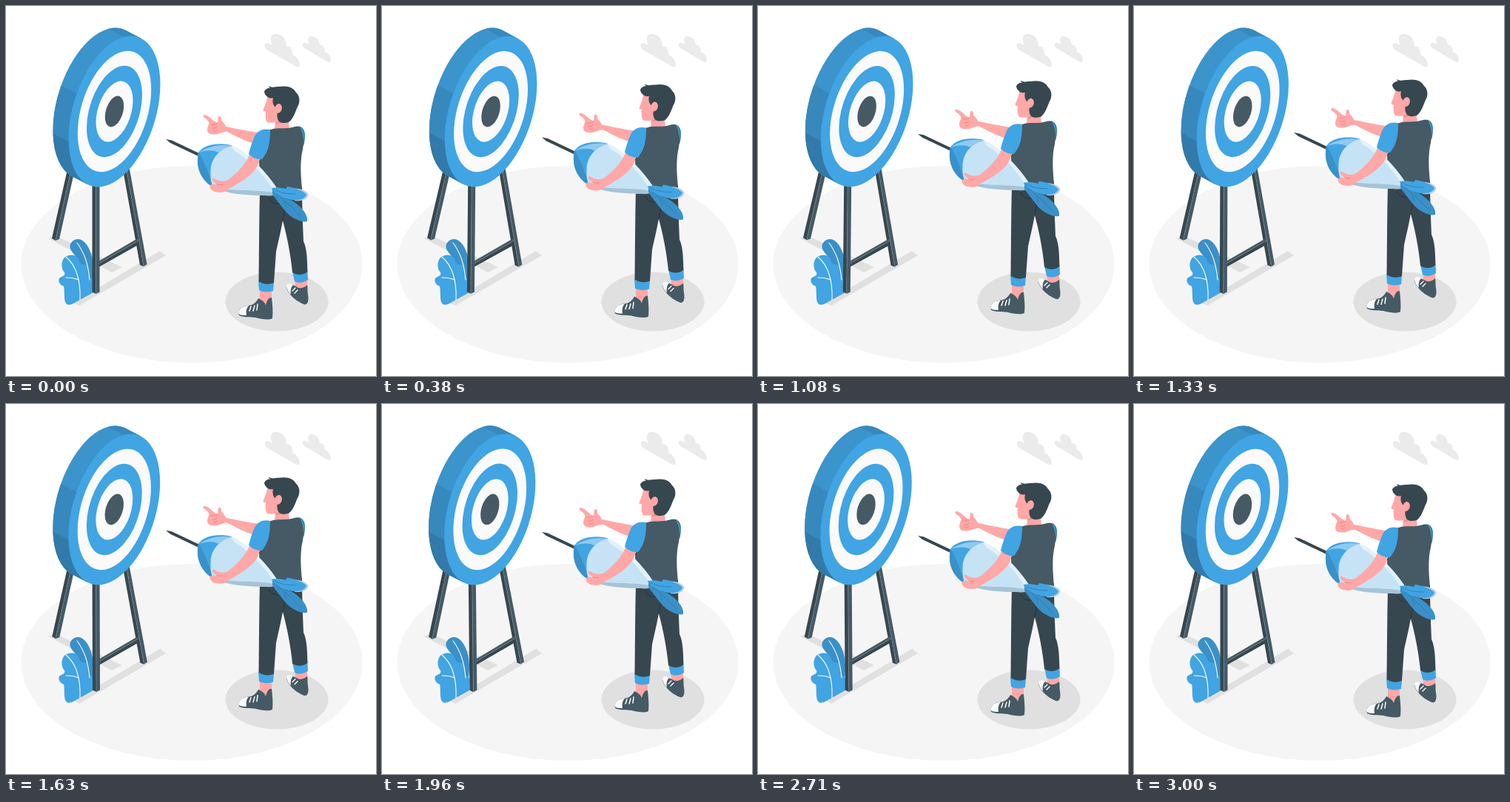
Animation of 500 by 500 pixels, one loop 3040 ms. Source, as an HTML page:

```html
<!DOCTYPE html>
<html lang="en">
<head>
<meta charset="utf-8">
<title>Aiming at the target</title>
<style>
html, body { margin: 0; width: 100%; height: 100%; overflow: hidden; background: #fff; }
svg { display: block; width: 100vw; height: 100vh; }
.blue { fill: #41a4e3; }
.deep { fill: #3a90c8; }
.dark { fill: #37474f; }
.slate { fill: #455a64; }
.skin { fill: #ffa8a7; }
.white { fill: #fafafa; }
.shade { fill: #e0e0e0; }
.cloud { fill: #ebebeb; }
.line { fill: none; stroke-linecap: round; }
</style>
</head>
<body>
<svg viewBox="0 0 500 500">
  <ellipse cx="251" cy="349" rx="230.500" ry="133" fill="#f5f5f5"/>

  <!-- floor shadows -->
  <g class="shade">
    <path d="M57 314L66 310L157 353L143 360Z"/>
    <path d="M91 401L208 331L216 337L99 405Z"/>
    <ellipse cx="366" cy="399.500" rx="69.500" ry="40"/>
  </g>

  <g class="cloud">
    <path d="M350 51C353 49 357 51 360 53C355 43 359 36 367 38C375 39 379 47 379 55C384 53 388 59 387 66C392 68 397 73 397 80C396 83 393 83 389 80L354 60C350 58 349 54 350 51Z"/>
    <path d="M401 51C403 48 407 50 410 53C406 45 409 40 414 41C420 42 424 47 424 53C428 52 431 57 431 62C435 63 439 68 439 74C438 77 435 76 432 74L405 58C402 56 400 54 401 51Z"/>
  </g>

  <!-- plant -->
  <path class="deep" d="M114 385C118 370 120 350 115 335C111 322 104 315 97 315C89 316 85 322 87 328C90 335 95 337 97 343L104 378Z"/>
  <path class="blue" d="M82 403C77 398 80 387 78 379C73 377 70 372 72 368C75 365 81 365 79 360C75 356 74 347 78 341C82 336 92 335 96 339C100 343 98 349 104 349C111 348 113 356 110 362C110 367 117 366 118 372L118 387L91 402C88 404 84 404 82 403Z"/>
  <g class="line" stroke="#fff" stroke-width="1.100">
    <path d="M96 320C106 334 111 348 113 370"/>
    <path d="M81 339C94 350 101 370 100 397M81 367C88 367 94 368 98 370"/>
  </g>

  <g id="stand">
    <path class="dark" d="M85 212L90 212L67 317L62 314Z"/>
    <path class="slate" d="M90 212L95 212L72 315L67 317Z"/>
    <path class="dark" d="M156 210L161 210L186 352L181 350Z"/>
    <path class="slate" d="M161 210L165 210L190.500 349L186 352Z"/>
    <path class="slate" d="M125 345L178 314L179 317L125 348Z"/>
    <path class="dark" d="M125 348L179 317L180 322L125 353Z"/>
    <path class="dark" d="M116.500 238H121.500V389L116.500 386.500Z"/>
    <path class="slate" d="M121.500 238H126.500V386.500L121.500 389Z"/>
    <path class="line" stroke="#7d909a" stroke-width=".6" d="M90 212L67 315M161 212L186 350M121.500 238V387M126 348L179 317"/>
    <!-- disc drawn as circles on a slanted plane -->
    <g transform="matrix(1 -.592 0 1.535 146.500 142.500)">
      <g fill="#3b94cc">
        <circle cx="-21" cy="-15.300" r="62"/>
        <path d="M-36.500 50.100l-21 -15.300L15.500 -65.400l21 15.300Z"/>
      </g>
      <path fill="#3788bd" d="M-83 -12.800A62 62 0 0 1 -72 -50.600l21 15.300L-62 2.500Z"/>
      <path fill="#327aa9" d="M-36.500 50.100l-21 -15.300A62 62 0 0 1 -83 -12.800l21 15.300Z"/>
      <path fill="#3788bd" d="M-8.100 -75.900A62 62 0 0 1 15.500 -65.400l21 15.300L12.900 -60.600Z"/>
      <circle class="blue" r="62"/>
      <circle class="white" r="49.700"/>
      <circle class="blue" r="37.500"/>
      <circle class="white" r="25"/>
      <circle class="slate" r="12.700"/>
    </g>
  </g>

  <g id="man">
    <!-- far foot and leg -->
    <path class="skin" d="M390 368H407V381C402 384 395 383 391 379Z"/>
    <path class="slate" d="M392 379C388 377 381 373 379 379C379 387 392 400 404 403.500C409 403 409 396 408 390C407 385 408 380 407 377C403 381 397 383 392 379Z"/>
    <path class="white" d="M388 377C383 374 379 375 379 379C380 384 382 387 385 390C384 385 385 380 388 377Z"/>
    <path class="line" stroke="#fff" stroke-width="1.400" d="M387 385L391 381M390 388L394 384"/>
    <path class="blue" d="M387 359C393 363 401 363 407.500 358L408 370C403 374 395 375 390 372Z"/>

    <!-- near foot -->
    <path class="skin" d="M343 382H359V398C355 404 348 404 343 398Z"/>
    <path class="slate" d="M341 395C338 401 333 405 326 405C318 406 313 411 315 418C320 421 330 420 337 421C345 423 355 425 360 422C361 413 360 403 359 394C355 394 353 397 351 404C349 399 345 397 341 395Z"/>
    <path class="white" d="M328 405C319 405 314 410 314.500 416C317 418 321 418 325 418C324 413 325 408 328 405Z"/>
    <path class="line" stroke="#fff" stroke-width="1.500" d="M329 412L331 406M334 412L336 405M339 411L340 403"/>
    <path class="blue" d="M341 371C347 375 355 376 362 373L361 385C355 387 347 387 342 384Z"/>

    <!-- trousers -->
    <path class="dark" d="M343 250L400 244C400 270 401 295 402 318C407 328 407 345 407.500 359C402 364 393 364 387 360C385 338 380 312 374 290C371 306 368 318 365 332C364 346 363 360 362 374C355 377 347 376 341.500 372C342 332 342 290 343 250Z"/>
    <path class="line" stroke="#263238" stroke-width="1" d="M378 266C377 276 375 283 374 290M355 259C358 266 364 268 370 267"/>

    <!-- pointing arm -->
    <path class="skin" d="M341 171C325 169 308 165 297 163C296 160 294 157 291 155C292 152 290 149 288.500 149C286 149 287 154 286 158C283 157 280 155 277 152C274 149 270 147 267.500 147C265 149 268 151 271 153C274 156 275 158 274 160C272 164 271 169 274 172C278 174 284 174 289 172C293 171 296 169 299 170C310 175 322 183 337 186Z"/>
    <path class="line" stroke="#f0807f" stroke-width=".9" d="M277 160C280 160 283 161 286 158M279 165C282 166 284 165 285 163M280 169C283 170 285 168 285 167"/>

    <!-- head -->
    <path class="skin" d="M354 118C353 126 351 132 348 139C347 141 348 143 351 142C350 149 351 155 353 157C357 158 361 158 364 157L363 165C369 168 378 167 383 165L381 150L374 118Z"/>
    <path d="M364 157C367 157 369 155 370 153L371 158C369 159 366 159 364 159Z" fill="#f28f8f"/>
    <path class="dark" d="M349 116C350 112 355 110 359 111C357 111 355 110 355 108C359 111 364 109 369 109C380 107 389 110 392 117C397 121 398 130 394 136C391 143 388 153 382 157C376 159 371 158 369 156C366 152 366 147 367 143L364 137C360 133 360 128 361 124C356 126 350 122 349 116Z"/>
    <ellipse class="skin" cx="368" cy="138.500" rx="4.800" ry="6.500" transform="rotate(15 368 138.500)"/>

    <!-- shirt and vest -->
    <path class="blue" d="M390 163C400 161 404 167 404 174C404 181 403 187 400 192Z"/>
    <path class="line" stroke="#37474f" stroke-width=".7" d="M398 163C404 168 404 178 402 188"/>
    <path class="slate" d="M356 168C362 164 372 166 382 165C388 164 393 162 397 163C402 171 403 182 401 194C398 206 398 220 399 235L400 249C382 256 362 258 343 256L342 209L352 193C353 182 354 175 356 168Z"/>

    <!-- dart -->
    <path class="dark" d="M216 180L224 181.500L263 200L261 203.500L222 185Z"/>
    <path fill="#c6e3f6" d="M260 198C266 190 277 186.500 288 186.500C300 186.500 311 191 321 198C340 212 357 231 369 251C366 255 358 256 350 256C325 256 300 254 283 247C268 240 258 225 259 206Z"/>
    <path fill="#e3f1fb" d="M303 188C311 190 320 196 327 203C343 216 358 233 369 251L365 254C351 232 333 210 309 196Z"/>
    <path fill="#a7c3d6" d="M278 244C300 251 336 247 368 253C364 256 356 257 350 256C325 256 298 254 278 244Z"/>
    <path class="blue" d="M260 198C266 190 277 186.500 288 186.500C296 186.500 301 187 306 189C292 190 277 205 276.500 222C276 231 277 238 279 244C266 237 258 222 259 206Z"/>
    <path class="deep" d="M260 198C266 206 273 222 279 244C266 237 258 222 259 206Z"/>
    <path fill="#8fcaf0" d="M261 198C274 189 290 186.500 306 189C299 190 293 193 287 198C279 194 270 195 261 198Z"/>
    <path class="deep" d="M360 247C367 251 374 259 380 261C385 261 392 266 398 272C404 278 408 285 407 291C400 293 388 288 379 279C374 273 365 262 360 254Z"/>
    <path fill="#b4cfe0" d="M386 247C396 245 407 250 408.500 255C407 262 398 264 390 263Z"/>
    <path class="blue" d="M359 246C368 244 374 246 378 247L380 244C391 246 403 250 406 255C403 262 394 263 386 262C376 260 367 257 359 247Z"/>
    <path class="line" stroke="#2f78a8" stroke-width=".8" d="M362 248C372 253 380 254 391 254M366 254C376 262 388 273 398 284M376 264L379 272"/>

    <!-- holding arm -->
    <path class="skin" d="M330 198C326 212 312 226 300 235C295 238 288 237 283 234C279 231 277 234 280 237C282 239 284 240 286 242C282 241 277 240 275.500 243C275 247 279 251 285 251.500C291 253 297 251 301 247C315 240 330 230 336 222C340 217 342 212 343 204Z"/>
    <path class="line" stroke="#f0807f" stroke-width=".9" d="M285 241C288 242 291 242 293 241"/>
    <path class="blue" d="M357 167C348 165 340 168 336 176C333 183 330 191 328 200C333 205 340 208 346 207C351 201 354 194 355 189C357 180 357 173 357 167Z"/>
  </g>
</svg>
<script>
const LOOP = 3040, CYCLE = 3000, FPS = 24;
const LIFT = 10, TILT = 1;
const stand = document.getElementById('stand');
const man = document.getElementById('man');

// Linear interpolation through [position, value] steps.
function track(steps, p) {
  const i = Math.max(1, steps.findIndex(s => s[0] >= p));
  const [a, va] = steps[i - 1], [b, vb] = steps[i];
  return va + (vb - va) * (p - a) / (b - a);
}

const rise = [[0, 0], [.5, -LIFT], [1, 0]];
const sway = [[0, 0], [.25, TILT], [.75, -TILT], [1, 0]];

function draw(now) {
  const tick = Math.floor(((now % LOOP) + 5) * FPS / 1000);
  const p = Math.min(1, tick * 1000 / FPS / CYCLE);
  man.setAttribute('transform', `translate(0 ${track(rise, p)})`);
  stand.setAttribute('transform', `rotate(${track(sway, p)} 135.5 209)`);
}

let start = null;
function loop(now) {
  if (start === null) start = now;
  draw(now - start);
  requestAnimationFrame(loop);
}
draw(0);
requestAnimationFrame(loop);
</script>
</body>
</html>
```
